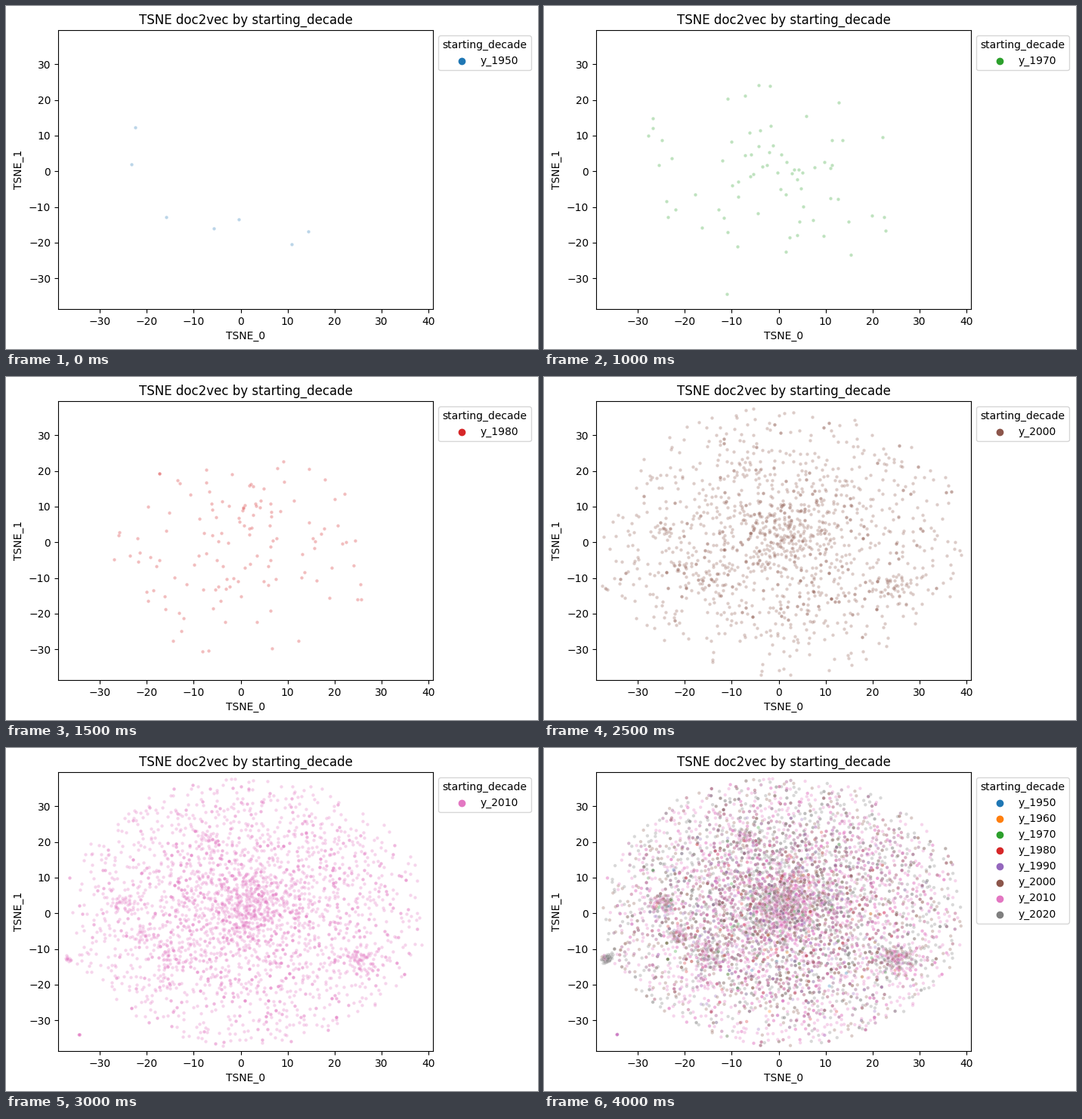
Write a matplotlib script that moves like this. It is 704 px wide and 455 px high and loops after 5 s.

```python
import numpy as np
import matplotlib.pyplot as plt
from matplotlib.animation import FuncAnimation

W, H, DPI = 704, 455, 100
AXES = (69.0, 53.2, 496, 369.6)  # left, bottom, width, height in pixels
COLORS = ["#1f77b4", "#ff7f0e", "#2ca02c", "#d62728",
          "#9467bd", "#8c564b", "#e377c2", "#7f7f7f"]
NAMES = [f"y_{year}" for year in range(1950, 2030, 10)]

FIRST = [(-22.4, 12.2), (-23.3, 2), (-15.9, -12.8), (-5.7, -16),
         (-.4, -13.5), (10.8, -20.4), (14.4, -16.8)]

# Per later decade: points, centre x and y, spread, points in the islet and stray
DECADES = [(16, 2, -8, 10.8, 0, 0),
           (72, -2, -4, 16, 0, 0),
           (130, 0, -2, 15, 0, 0),
           (330, 0, -3, 17, 0, 1),
           (1400, 2, 0, 24, 4, 0),
           (3100, 2, 1, 24, 14, 6),
           (2350, 1, 5, 22, 110, 0)]

# Topics: x, y, spread, share of a decade's points
TOPICS = [(0, 3, 8, .09), (2, 2.5, 4, .04), (25, -13, 2.2, .025),
          (-25, 2.5, 1.6, .013), (-14.5, -12, 2.2, .015),
          (-21, -6, 1.2, .008), (-7, 21, 1.6, .008)]
ISLET = (-36.6, -12.8)
STRAY = (-34.4, -34)

rng = np.random.default_rng(12)


def make_sites(n=4400):
    """Evenly spread sites in an ellipse, a little denser in the middle."""
    i = np.arange(n) + .5
    r, a = (i / n) ** .56, i * np.pi * (3 - 5 ** .5)
    xy = np.column_stack([1.1 + 38.6 * r * np.cos(a), .4 + 37.9 * r * np.sin(a)])
    return xy + rng.normal(0, .3, xy.shape)


def field(n, cx, cy, width):
    """Pick sites that grow rarer away from a centre."""
    d = np.hypot(sites[:, 0] - cx, sites[:, 1] - cy) / width
    p = np.where(d < 2, np.exp(-d ** 2 / 2), 0)
    return sites[rng.choice(len(sites), n, p=p / p.sum())]


def blob(center, spread, n):
    return rng.normal(center, spread, (n, 2))


def decade(n, cx, cy, width, islet, stray):
    topics = [blob((x, y), s, round(n * share)) for x, y, s, share in TOPICS]
    rest = n - sum(map(len, topics))
    return np.vstack([field(rest, cx, cy, width), *topics,
                      blob(ISLET, .5, islet), blob(STRAY, .04, stray)])


sites = make_sites()
points = [np.array(FIRST)] + [decade(*d) for d in DECADES]
every = np.vstack(points)
hues = np.repeat(COLORS, [len(p) for p in points])
order = rng.permutation(len(every))
every, hues = every[order], hues[order]

fig = plt.figure(figsize=(W / DPI, H / DPI), dpi=DPI, facecolor="white")
left, bottom, width, height = AXES
ax = fig.add_axes([left / W, bottom / H, width / W, height / H])


def draw(i):
    ax.clear()
    if i < len(points):
        xy, color, shown = points[i], COLORS[i], [i]
    else:
        xy, color, shown = every, hues, range(len(points))
    ax.scatter(xy[:, 0], xy[:, 1], s=10, c=color, alpha=.3,
               edgecolors="white", linewidths=.25)
    for k in shown:
        ax.scatter([], [], color=COLORS[k], label=NAMES[k])
    ax.legend(title="starting_decade", loc="upper left", bbox_to_anchor=(1, 1))
    ax.set(xlim=(-38.9, 40.97), ylim=(-38.6, 39.53),
           xlabel="TSNE_0", ylabel="TSNE_1",
           title="TSNE doc2vec by starting_decade",
           xticks=range(-30, 41, 10), yticks=range(-30, 31, 10))
    return []


anim = FuncAnimation(fig, draw, frames=10, interval=500,
                     init_func=lambda: [], repeat=True, repeat_delay=0)
plt.show()
```
